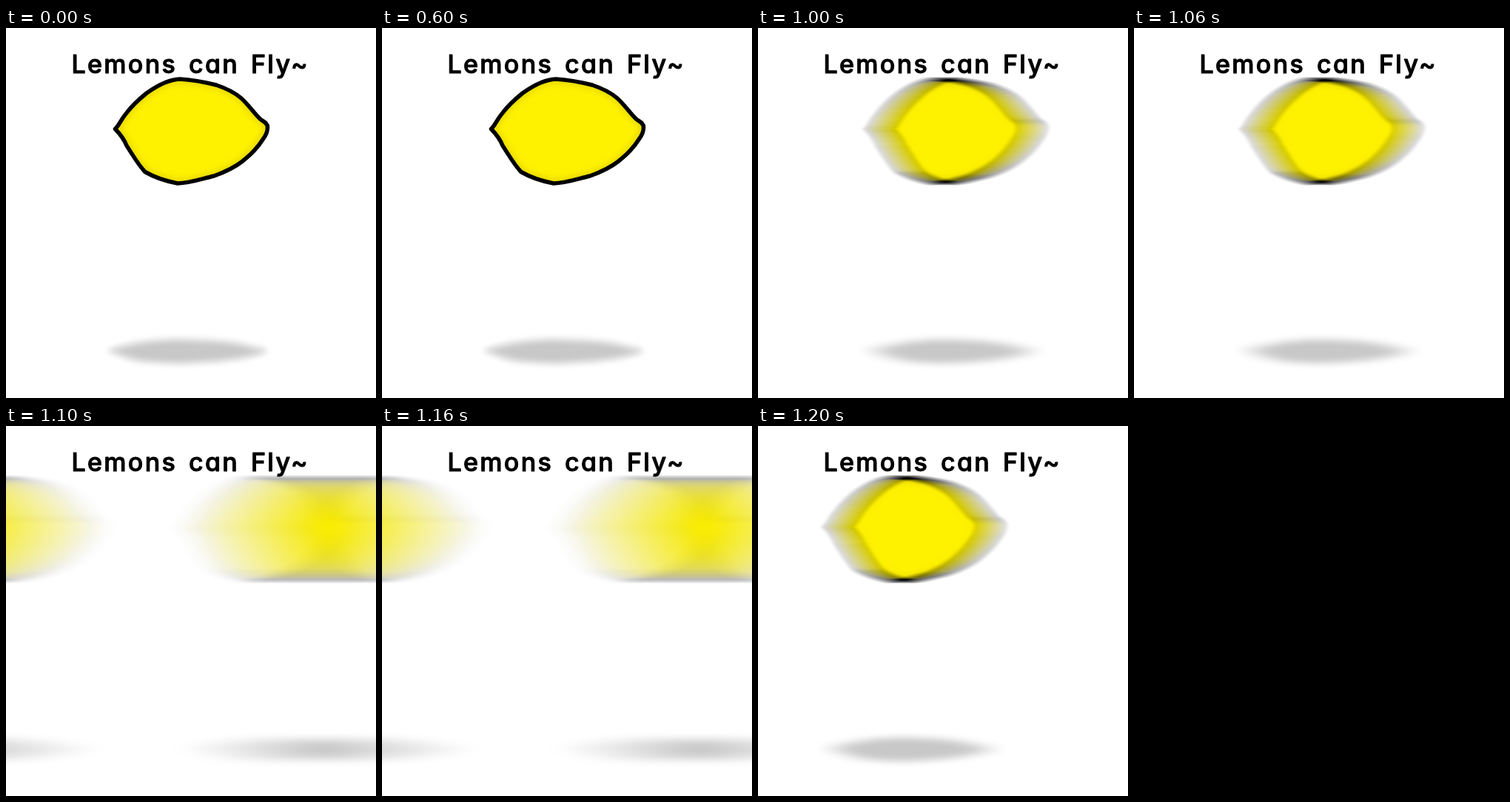
An HTML page with a canvas for the animation above (1300 ms loop, 500 by 500 pixels).

```html
<!DOCTYPE html>
<html lang="en">
<head>
<meta charset="utf-8">
<title>Lemons can Fly~</title>
<style>
  html, body { margin: 0; width: 100%; height: 100%; overflow: hidden; background: #fff; }
  canvas, svg { position: absolute; inset: 0; width: 100%; height: 100%; }
  text {
    font: 500 34px Inter, "Open Sans", sans-serif;
    font-feature-settings: "cv11", "ss03";
    letter-spacing: 2.3px;
    stroke: #000;
    stroke-width: 1;
    stroke-linejoin: round;
  }
</style>
</head>
<body>
<canvas id="stage" width="500" height="500"></canvas>
<svg viewBox="0 0 500 500">
  <text y="61"><tspan x="88.5">Lemons</tspan> <tspan x="247">can</tspan> <tspan x="331">Fly~</tspan></text>
</svg>
<script>
const SIZE = 500;
const LOOP = 1300;
const REST = 1000;
const STEP = 100;

// Horizontal offset of each pose, its smear length and the softness of the smear's ends
const poses = [
  { shift: 0, length: 1, softness: 1 },
  { shift: 17, length: 45, softness: 5 },
  { shift: 184, length: 189, softness: 41 },
  { shift: -39, length: 45, softness: 5 },
];

const lemon = new Path2D(`M147.5 136.5 C153 131 156 123 162 116
  C170 105 180 96 190 88 C204 78 220 69.5 235 69 C253 70 268 73 284 77
  C299 82 309 87 318 95 C328 104 335 115 343 122.5 C348 127 353.5 128 353.5 134
  Q353.5 142 347.5 150 C340 162 330 172 319 180.5 C308 189 295 195 281 200
  C264 204 249 209.5 232 210 C216 207 201 202 188 194.5
  C178 184 171 171 163 159 C159 149 153 142 147.5 136.5 Z`);

function makeContext() {
  const canvas = document.createElement("canvas");
  canvas.width = canvas.height = SIZE;
  return canvas.getContext("2d", { willReadFrequently: true });
}

function drawScene(ctx) {
  ctx.fillStyle = "#fff";
  ctx.fillRect(0, 0, SIZE, SIZE);
  ctx.lineJoin = ctx.lineCap = "round";
  ctx.lineWidth = 5.5;

  // Ground shadow: the same outline, squashed
  ctx.save();
  ctx.filter = "blur(4px)";
  ctx.translate(-10, 437 - 139.5 * 0.22);
  ctx.scale(1.015, 0.22);
  ctx.fillStyle = ctx.strokeStyle = "#c8c8c8";
  ctx.fill(lemon);
  ctx.stroke(lemon);
  ctx.restore();

  ctx.fillStyle = "#fff200";
  ctx.fill(lemon);
  ctx.save();
  ctx.clip(lemon);
  ctx.filter = "blur(5px)";
  ctx.strokeStyle = "rgba(215, 200, 0, 0.8)";
  ctx.lineWidth = 9;
  ctx.stroke(lemon);
  ctx.restore();
  ctx.stroke(lemon);
}

// Motion blur: a sliding mean along each row, wrapping at the stage edges
function smear(source, length, shift = 0) {
  const result = new ImageData(SIZE, SIZE);
  const reach = (length - 1) / 2;
  const wrap = x => (x + 2 * SIZE) % SIZE;
  for (let y = 0; y < SIZE; y++) {
    for (let channel = 0; channel < 4; channel++) {
      const index = x => (y * SIZE + wrap(x)) * 4 + channel;
      let sum = 0;
      for (let k = -reach; k <= reach; k++) sum += source.data[index(k - shift)];
      for (let x = 0; x < SIZE; x++) {
        result.data[index(x)] = sum / length;
        const center = x - shift;
        sum += source.data[index(center + reach + 1)] - source.data[index(center - reach)];
      }
    }
  }
  return result;
}

const scene = makeContext();
drawScene(scene);
const still = scene.getImageData(0, 0, SIZE, SIZE);
const pictures = poses.map(({ shift, length, softness }) =>
  smear(smear(still, length, shift), softness));
const stage = document.getElementById("stage").getContext("2d");
let shown = -1;

function render() {
  const time = performance.now() % LOOP;
  const current = time < REST ? 0 : 1 + Math.floor((time - REST) / STEP);
  if (current !== shown) {
    stage.putImageData(pictures[current], 0, 0);
    shown = current;
  }
  requestAnimationFrame(render);
}
render();
</script>
</body>
</html>
```
